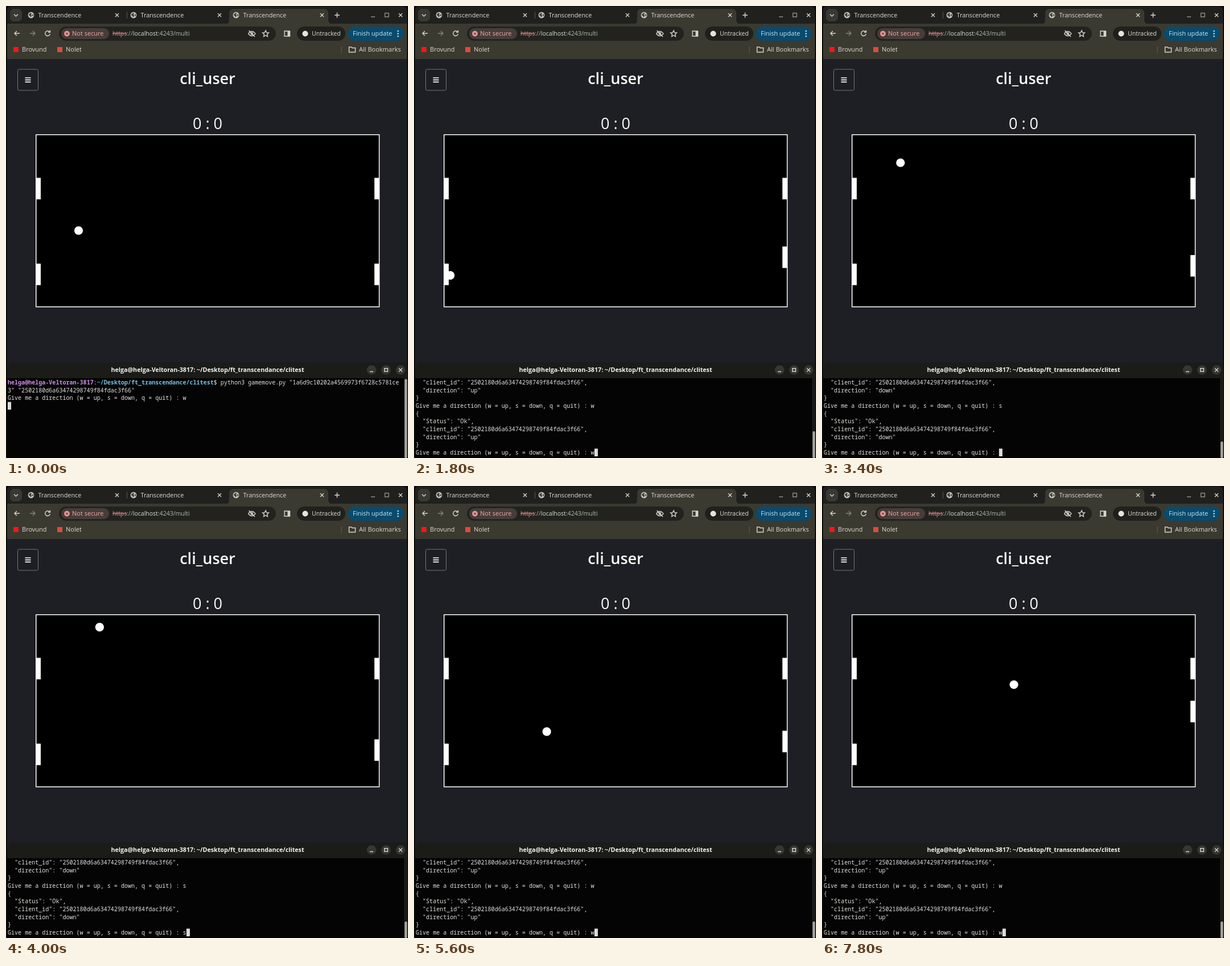
An HTML page that plays this animation: 706x793 px, repeating every 8000 ms.

```html
<!DOCTYPE html>
<html lang="en">
<head>
<meta charset="utf-8">
<title>Pong over a command line</title>
<style>
html, body { margin: 0; width: 100%; height: 100%; overflow: hidden; background: #0c0d0b; }
svg { display: block; width: 706px; height: 793px; }
text { font-family: "Open Sans", "Noto Sans", sans-serif; font-size: 11px; fill: #deded8; white-space: pre; }
.mid { text-anchor: middle; }
#rows text { font-family: "Noto Sans Mono", "DejaVu Sans Mono", monospace; font-size: 10.06px; font-weight: 500; fill: #e4e4e0; }
.line { fill: none; stroke: #d6d6d0; stroke-width: 1.4; }
</style>
</head>
<body>
<svg viewBox="0 0 706 793">
  <defs>
    <clipPath id="court"><rect x="53" y="226" width="602.5" height="302"/></clipPath>
    <g id="globe">
      <circle r="5.4" fill="#c9c9c4"/>
      <path d="M-3.8-1.5 L-1-3.8 L1.5-3.2 L-.2-.8 L1.6.8 L-.8 4 L-2.2 1.2 L-4 .5Z M2-1.4 L4.2-1.6 L4.2 1.5 L2.6 2.2Z" fill="#3c3d38"/>
    </g>
    <path id="cross" d="M-3-3 L3 3 M3-3 L-3 3" class="line"/>
  </defs>

  <!-- tab strip -->
  <path d="M2 793V8Q2 1 10 1H696Q704 1 704 8V793Z" fill="#20211e"/>
  <rect x="7" y="5" width="21" height="22" rx="7" fill="#383932"/>
  <path class="line" d="M14 14.5 l3.5 3.5 l3.5-3.5"/>
  <path d="M384 32Q392 32 392 24V13Q392 5 400 5H558Q566 5 566 13V24Q566 32 574 32Z" fill="#3a3a31"/>
  <g id="tabs"></g>
  <path d="M212.5 10V22" stroke="#55564f"/>
  <path class="line" d="M577 16H586M581.5 11.5V20.5"/>
  <path class="line" d="M641 19H648M665.5 12.5H672V19H665.5Z" style="stroke:#8d8e88"/>
  <use href="#cross" x="693" y="16"/>

  <!-- toolbar -->
  <rect x="2" y="31" width="702" height="62" fill="#3a3a31"/>
  <path class="line" d="M24 48H15M19 44L15 48L19 52"/>
  <path class="line" d="M42 48H51M47 44L51 48L47 52" style="stroke:#85867f"/>
  <path class="line" d="M76.5 45.5A4.3 4.3 0 1 0 77.3 49M77.5 42.5V46H74"/>
  <rect x="93" y="36" width="381" height="25" rx="12.5" fill="#22231f"/>
  <rect x="97" y="39" width="84" height="19" rx="9.5" fill="#473d3b"/>
  <circle cx="107" cy="48.5" r="4.8" fill="#f09a98"/>
  <path d="M105.3 46.8l3.4 3.4m0-3.4l-3.4 3.4" stroke="#473d3b" stroke-width="1.2"/>
  <text x="116" y="52" style="fill:#f2aaa6;font-weight:500">Not secure</text>
  <text x="187" y="52" style="font-size:10.5px"><tspan fill="#e58c88" text-decoration="line-through">https</tspan><tspan fill="#a9aaa4">://</tspan>localhost<tspan fill="#b9bab4">:4243/multi</tspan></text>
  <path class="line" d="M425.5 48.5Q431.5 40.5 438 48.5Q431.5 56.5 425.5 48.5M426.5 43L437 54"/>
  <circle class="line" cx="431.7" cy="48.5" r="1.7"/>
  <path class="line" d="M456 43l1.6 3.6 3.9.4-2.9 2.6.8 3.9-3.4-2-3.4 2 .8-3.9-2.9-2.6 3.9-.4Z"/>
  <path class="line" d="M489 44H498.5V53H489Z"/>
  <rect x="494.5" y="44" width="4.5" height="9" fill="#d6d6d0"/>
  <rect x="511" y="36" width="85" height="25" rx="12.5" fill="#20211d"/>
  <circle cx="525.5" cy="48.5" r="5" fill="#e4e4df"/>
  <text x="537" y="52" style="font-size:10.6px;font-weight:500">Untracked</text>
  <rect x="600" y="36" width="99" height="25" rx="12.5" fill="#0a4a6c"/>
  <text x="609" y="52" style="fill:#c6e7fa">Finish update</text>
  <g fill="#c6e7fa"><circle cx="688.5" cy="44" r="1.3"/><circle cx="688.5" cy="48.5" r="1.3"/><circle cx="688.5" cy="53" r="1.3"/></g>

  <!-- bookmarks -->
  <rect x="13" y="72" width="9" height="9" fill="#f01818"/>
  <text x="28" y="80">Brovund</text>
  <rect x="90" y="72" width="9" height="9" fill="#e34a3c"/>
  <text x="105" y="80">Nolet</text>
  <path d="M589 71V82" stroke="#62635b"/>
  <path class="line" d="M602.5 72H606.5L608 73.5H613.5V81H602.5Z"/>
  <text x="620" y="80">All Bookmarks</text>

  <!-- page -->
  <rect x="2" y="93" width="702" height="540" fill="#1e1f25"/>
  <rect x="20.5" y="111" width="36" height="37" rx="3" fill="#1d1e24" stroke="#74757c"/>
  <path d="M33.5 126H43.5M33.5 129.7H43.5M33.5 133.4H43.5" stroke="#fff" stroke-width="1.7"/>
  <text class="mid" x="354" y="136.5" style="font-size:27px;font-weight:600;fill:#fbfbf6">cli_user</text>
  <text class="mid" x="354" y="216" style="font-size:27px;fill:#fbfbf6">0 : 0</text>
  <rect x="52.75" y="225.75" width="602.75" height="302" fill="#000" stroke="#fff" stroke-width="1.5"/>
  <g fill="#fff" clip-path="url(#court)">
    <rect x="53" y="301.5" width="8" height="37.7"/>
    <rect x="53" y="452" width="8" height="37.7"/>
    <rect x="647" y="301.5" width="8.5" height="37.7"/>
    <rect id="paddle" x="647" width="8.5" height="37.7"/>
    <circle id="ball" r="7.6"/>
  </g>

  <!-- terminal -->
  <path d="M2 654V634Q2 625 11 625H696Q705 625 705 634V654Z" fill="#1b1c18"/>
  <text class="mid" x="354" y="642.3" style="font-size:10.7px;font-weight:700;fill:#f4f4ee">helga@helga-Veltoran-3817: ~/Desktop/ft_transcendance/clitest</text>
  <g fill="#363731"><circle cx="642" cy="638.5" r="8.3"/><circle cx="667.5" cy="638.5" r="8.3"/><circle cx="693" cy="638.5" r="8.3"/></g>
  <path class="line" d="M639 641.5H645M664.7 635.7H670.3V641.3H664.7Z"/>
  <use href="#cross" x="693" y="638.5"/>
  <rect x="2" y="653" width="703" height="140" fill="#030403"/>
  <rect x="699" y="653" width="6" height="140" fill="#191a17"/>
  <rect id="thumb" x="700" width="4.5" rx="2" fill="#a3a39f"/>
  <rect id="cursor" width="6.04" height="13.5" fill="#dcdcd8"/>
  <g id="rows"></g>
</svg>
<script>
const $ = id => document.getElementById(id);
const LOOP = 8000, STEP = 200, ROWS = 10, CHAR = 6.036, LINE = 13.65;

$('tabs').innerHTML = [44, 224, 404].map(x =>
  `<use href="#globe" x="${x}" y="16"/>
   <text x="${x + 12.5}" y="20" style="font-size:10.8px">Transcendence</text>
   <use href="#cross" x="${x + 151}" y="16"/>`).join('');

$('rows').innerHTML = Array.from({ length: ROWS }, (_, i) =>
  `<text x="3" y="${664 + i * LINE}"></text>`).join('');
const rows = [...$('rows').children];

// Keys entered by the player and the step at which each reply arrives.
const keys = 'wwwwwssssswwwwwwwwwww';
const replies = [1, 3, 6, 8, 10, 13, 15, 17, 19, 21, 23, 25, 27, 29, 30, 31, 33, 35, 36, 38, 40];

// Vertical distance travelled by the ball: [time, distance].
const travel = [[0, 0], [1000, 84.5], [2400, 268], [3400, 387], [5000, 575.5], [6400, 728], [7800, 917.5]];

const id = '2502180d6a63474298749f84fdac3f66';
const question = 'Give me a direction (w = up, s = down, q = quit) : ';
const command = [
  '<tspan font-weight="700" fill="#cf8ee6">helga@helga-Veltoran-3817</tspan>:' +
  '<tspan font-weight="700" fill="#79bfe6">~/Desktop/ft_transcendance/clitest</tspan>' +
  '$ python3 gamemove.py "1a6d9c10202a4569973f6728c5781ce',
  `3" "${id}"`
];
const reply = key => ['{', '  "Status": "Ok",', `  "client_id": "${id}",`,
  `  "direction": "${key === 'w' ? 'up' : 'down'}"`, '}'];

function distanceAt(t) {
  const i = Math.max(1, travel.findIndex(p => p[0] >= t));
  const [t0, d0] = travel[i - 1], [t1, d1] = travel[i];
  return d0 + (d1 - d0) * (t - t0) / (t1 - t0);
}

function drawGame(t, done) {
  const d = distanceAt(t);
  const phase = (168 + d) % 604;
  $('ball').setAttribute('cx', 60 + Math.abs(67.5 - 0.3755 * d));
  $('ball').setAttribute('cy', 226 + Math.min(phase, 604 - phase));
  const offset = [...keys.slice(0, done)].reduce((y, k) => y + (k === 'w' ? -7.52 : 7.52), 0);
  $('paddle').setAttribute('y', 452 + offset);
}

function drawTerminal(step, done) {
  const lines = [...command];
  for (const key of keys.slice(0, done)) lines.push(question + key, ...reply(key));
  const typed = replies[done] <= step + 1 ? keys[done] : '';
  lines.push(question + typed);
  if (step === 0) lines.push('');

  const shown = lines.slice(-ROWS);
  rows.forEach((row, i) => row.innerHTML = shown[i] || '');
  const last = shown.length - 1;
  $('cursor').setAttribute('x', 3 + shown[last].length * CHAR);
  $('cursor').setAttribute('y', 653.7 + last * LINE);

  const size = Math.max(29, 1456 / Math.max(ROWS, lines.length) - 7);
  $('thumb').setAttribute('height', size);
  $('thumb').setAttribute('y', 793 - size);
}

let drawn = -1;
function render(now) {
  const step = Math.floor(now % LOOP / STEP);
  if (step !== drawn) {
    drawn = step;
    const done = replies.filter(r => r <= step).length;
    drawGame(step * STEP, done);
    drawTerminal(step, done);
  }
}

const start = performance.now();
function tick() {
  render(performance.now() - start);
  requestAnimationFrame(tick);
}
tick();
</script>
</body>
</html>
```
